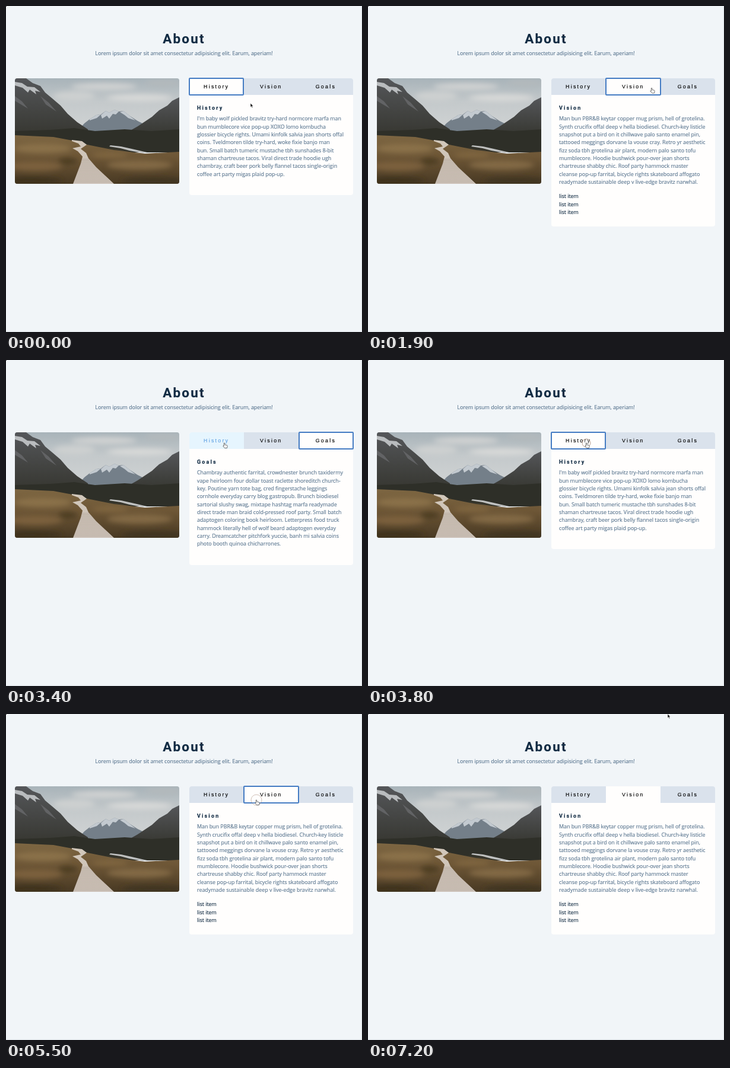
Animation of 600 by 550 pixels, one loop 7.3 s. Source, as an HTML page:

```html
<!DOCTYPE html>
<html lang="en">
<head>
<meta charset="utf-8">
<title>About</title>
<style>
  html, body { margin: 0; width: 100%; height: 100%; overflow: hidden; }
  body { position: relative; background: #f1f5f8; color: #102a42; font: 8.89px/13.33px "Open Sans", sans-serif; -webkit-text-stroke: .15px; }
  #stage { position: absolute; left: 0; top: 0; width: 600px; height: 550px; overflow: hidden; box-sizing: border-box; border: solid #dde2e6; border-width: 0 1px 1px 0; }
  #stage > * { position: absolute; }
  #corner { left: 0; top: 0; width: 1px; height: 1px; background: #333; }
  h2, h4, p { margin: 0; white-space: pre; }
  h2, h4 { font-family: Roboto, sans-serif; font-weight: 700; letter-spacing: 2.22px; }
  h2 { left: 0; top: 41.5px; width: 600px; text-align: center; font-size: 22.4px; line-height: 27.8px; }
  p { color: #5a7690; }
  #lead { left: 0; top: 73.3px; width: 600px; text-align: center; }
  #photo { left: 15px; top: 122px; width: 276.5px; height: 177.5px; border-radius: 4px; }
  #card { left: 308.6px; top: 122px; width: 276.4px; background: #fffefd; border-radius: 4px; overflow: hidden; }
  .tab { position: absolute; top: 0; width: 92.13px; height: 28px; text-align: center; font: 8.89px/28px Arial, "Liberation Sans", sans-serif; letter-spacing: 2.22px; }
  .panel { position: absolute; left: 13.4px; top: 45px; }
  .panel h4 { font-size: 8.89px; line-height: 11.1px; margin-bottom: 5.2px; }
  .panel div { white-space: pre; margin-top: 11.1px; }
  #ring { top: 121.4px; width: 89.2px; height: 25.4px; border: 2px solid #457cc3; border-radius: 2px; }
  #overlay { left: 0; top: 0; }
</style>
</head>
<body>
<div id="stage">
  <h2>About</h2>
  <p id="lead">Lorem ipsum dolor sit amet consectetur adipisicing elit. Earum, aperiam!</p>

  <svg id="photo" viewBox="15 122 276.5 177.5" preserveAspectRatio="none">
    <defs>
      <linearGradient id="sky" x2="0" y2="1"><stop stop-color="#a8b3b9"/><stop offset=".4" stop-color="#c4c9cb"/><stop offset="1" stop-color="#d3d6d6"/></linearGradient>
      <linearGradient id="grass" x2="0" y2="1"><stop stop-color="#7d6642"/><stop offset=".45" stop-color="#6d5636"/><stop offset="1" stop-color="#483923"/></linearGradient>
      <linearGradient id="rock" x2="0" y2="1"><stop stop-color="#55575a"/><stop offset="1" stop-color="#35352f"/></linearGradient>
      <linearGradient id="wood" x2="0" y2="1"><stop stop-color="#d2c8bb"/><stop offset="1" stop-color="#cbc0b6"/></linearGradient>
      <filter id="soft" x="-30%" y="-60%" width="160%" height="220%"><feGaussianBlur stdDeviation="4"/></filter>
    </defs>
    <path fill="url(#sky)" d="M15 122h277v100H15z"/>
    <g filter="url(#soft)">
      <ellipse cx="165" cy="136" rx="55" ry="6" fill="#d0d2d2"/>
      <ellipse cx="115" cy="152" rx="35" ry="8" fill="#cdd0d0"/>
      <ellipse cx="225" cy="155" rx="55" ry="6" fill="#d8d9d8"/>
      <ellipse cx="265" cy="130" rx="30" ry="6" fill="#b3b9bc"/>
    </g>
    <path fill="#747f89" d="M118 214l14-16 9-7 11-7 8-1 8-6 6 3 9-5 7 3 8-1 10 8 14 9 16 8 10 12z"/>
    <path fill="#c3cad0" d="M141 191l11-7 8-1-7 6-12 4zM160 184l8-7 6 3 9-5 7 3-5 5-5-1-6 8-4-5-8 5zM192 179l6-2 10 8 10 8-12-4-6-5z"/>
    <path fill="url(#rock)" d="M292 154l-12 6-8 8-14 8-12 11-12 8-12 8-14 8v10h84z"/>
    <path fill="url(#rock)" d="M15 122h19l11 8 13 5 8 11 12 10 14 12 12 14 16 14 18 12v14H15z"/>
    <path fill="#b9bcbe" d="M15 128l12 2 9 6 12 1 10 8-9-2 2 6-11-8-3 5-9-8-13-4z"/>
    <path fill="#626365" d="M58 152l14 11 13 15-18-12zM15 152l12 9 10 12-22-13z"/>
    <path fill="#2e2f28" d="M15 211l60-2 40-3 35 5 50-3 45 3 47-3v39H15z"/>
    <path fill="url(#grass)" d="M15 218l65 3 32 6 25 7 45 9 52 6 58-3v54H15z"/>
    <path fill="#bfc1c1" d="M176 235l18 2 18 4 26 6-8 1-22-4-15-4-19-3z"/>
    <g filter="url(#soft)">
      <ellipse cx="62" cy="240" rx="48" ry="8" fill="#8a7149"/>
      <ellipse cx="50" cy="270" rx="45" ry="8" fill="#7b613c"/>
      <ellipse cx="225" cy="268" rx="55" ry="8" fill="#826945"/>
      <ellipse cx="175" cy="251" rx="30" ry="5" fill="#806640"/>
      <ellipse cx="40" cy="295" rx="55" ry="6" fill="#3d301d"/>
      <ellipse cx="250" cy="296" rx="55" ry="7" fill="#413421"/>
      <ellipse cx="104" cy="262" rx="16" ry="6" fill="#4d3d24"/>
    </g>
    <path fill="url(#wood)" d="M113 300h69l-30-28-13-15-4-9-9-7 10-7-8-6-17-2v2l11 4 4 5-14 3 9 5 8 9-3 12z"/>
    <path id="planks" stroke="#9a8d80" stroke-width=".5" opacity=".5"/>
  </svg>

  <div id="card"></div>
  <div id="ring"></div>
  <i id="corner"></i>
  <svg id="overlay" width="600" height="550">
    <circle id="pulse" fill="#fff" fill-opacity=".35" stroke="#a1806d"/>
    <path id="arrow" d="M0 0v6.6l1.6-1.4 1.1 2.5 1.1-.5-1.1-2.4h2z" fill="#111" stroke="#fff" stroke-width=".5"/>
    <path id="hand" d="M-.8.3Q0-.6.7.3L1 3l3.3.8q1 .3.8 1.3L4.5 8.6H.6L-2.2 5.2q-.2-1 1.6-.2z" fill="#fff" stroke="#444" stroke-width=".75"/>
  </svg>
</div>

<script>
const LOOP = 7300, STEP = 100, PULSE = 400;
const $ = id => document.getElementById(id);

const tabs = [
  { name: 'History', height: 196.8, text: `I'm baby wolf pickled bravitz try-hard normcore marfa man
bun mumblecore vice pop-up XOXO lomo kombucha
glossier bicycle rights. Umami kinfolk salvia jean shorts offal
coins. Tveldmoren tilde try-hard, woke fixie banjo man
bun. Small batch tumeric mustache tbh sunshades 8-bit
shaman chartreuse tacos. Viral direct trade hoodie ugh
chambray, craft beer pork belly flannel tacos single-origin
coffee art party migas plaid pop-up.` },
  { name: 'Vision', height: 250, list: 'list item\nlist item\nlist item', text: `Man bun PBR&B keytar copper mug prism, hell of grotelina.
Synth crucifix offal deep v hella biodiesel. Church-key listicle
snapshot put a bird on it chillwave palo santo enamel pin,
tattooed meggings dorvane la vouse cray. Retro yr aesthetic
fizz soda tbh grotelina air plant, modern palo santo tofu
mumblecore. Hoodie bushwick pour-over jean shorts
chartreuse shabby chic. Roof party hammock master
cleanse pop-up farrital, bicycle rights skateboard affogato
readymade sustainable deep v live-edge bravitz narwhal.` },
  { name: 'Goals', height: 223.5, text: `Chambray authentic farrital, crowdnester brunch taxidermy
vape heirloom four dollar toast raclette shoreditch church-
key. Poutine yarn tote bag, cred fingerstache leggings
cornhole everyday carry blog gastropub. Brunch biodiesel
sartorial slushy swag, mixtape hashtag marfa readymade
direct trade man braid cold-pressed roof party. Small batch
adaptogen coloring book heirloom. Letterpress food truck
hammock literally hell of wolf beard adaptogen everyday
carry. Dreamcatcher pitchfork yuccie, banh mi salvia coins
photo booth quinoa chicharrones.` }
];

const looks = {
  idle: ['#dae2ec', '#000'],
  hover: ['#e6f5fe', '#64a4e4'],
  active: ['#fffefd', '#000']
};
// start, end, tab
const hovers = [[600, 1000, 1], [2000, 2400, 2], [2800, 3100, 1], [3100, 3700, 0], [4200, 5300, 1]];
// time, tab
const clicks = [[1000, 1], [2400, 2], [3700, 0], [5300, 1]];
const BLUR = 6500;
// time, x, y of the pointer tip
const route = [
  [0, 412, 164], [300, 412, 164], [800, 415, 139], [1500, 415, 139],
  [2200, 519, 138], [2600, 519, 138], [3300, 368, 140], [4000, 368, 140],
  [4400, 422, 145], [5600, 422, 145], [6200, 505, 0], [LOOP, 505, 0]
];

const mix = (a, b, k) => a + (b - a) * k;
const ease = k => k * k * (3 - 2 * k);

function add(parent, tag, className, text) {
  const node = parent.appendChild(document.createElement(tag));
  node.className = className;
  node.textContent = text;
  return node;
}

tabs.forEach((tab, i) => {
  tab.button = add($('card'), 'div', 'tab', tab.name);
  tab.button.style.left = i * 92.13 + 'px';
  tab.panel = add($('card'), 'section', 'panel', '');
  add(tab.panel, 'h4', '', tab.name);
  add(tab.panel, 'p', '', tab.text);
  if (tab.list) add(tab.panel, 'div', '', tab.list);
});

let planks = '';
for (let y = 258, gap = 1.2; y < 299; y += gap, gap *= 1.03) {
  const k = (y - 258) / 42;
  planks += `M${mix(128, 113, k)} ${y}H${mix(139, 180, k)}`;
}
$('planks').setAttribute('d', planks);

function pointerAt(t) {
  const i = route.findIndex(p => p[0] > t);
  const [a, b] = [route[i - 1], route[i]];
  const k = ease((t - a[0]) / (b[0] - a[0]));
  return [mix(a[1], b[1], k), mix(a[2], b[2], k)];
}

function draw(t) {
  const click = clicks.filter(c => c[0] <= t).pop();
  const active = click ? click[1] : 0;
  const hover = hovers.find(h => h[0] <= t && t < h[1]);
  tabs.forEach((tab, i) => {
    const look = i === active ? 'active' : hover && hover[2] === i ? 'hover' : 'idle';
    [tab.button.style.background, tab.button.style.color] = looks[look];
    tab.panel.style.display = i === active ? 'block' : 'none';
  });
  $('card').style.height = tabs[active].height + 'px';
  $('ring').style.left = 308.3 + active * 92.13 + 'px';
  $('ring').style.display = t < BLUR ? 'block' : 'none';

  const [x, y] = pointerAt(t);
  const overTab = x > 309 && x < 585 && y > 122 && y < 150;
  for (const [id, shown] of [['arrow', !overTab], ['hand', overTab]]) {
    $(id).setAttribute('transform', `translate(${x} ${y})`);
    $(id).style.display = shown ? 'inline' : 'none';
  }
  const age = click ? Math.min(t - click[0], PULSE) : PULSE;
  const pulse = $('pulse');
  pulse.setAttribute('cx', x);
  pulse.setAttribute('cy', y);
  pulse.setAttribute('r', 5 + age / 50);
  pulse.style.opacity = 1 - age / PULSE;
}

function tick() {
  const t = performance.now() % LOOP;
  draw(Math.floor(t / STEP) * STEP);
  requestAnimationFrame(tick);
}
tick();
</script>
</body>
</html>
```
